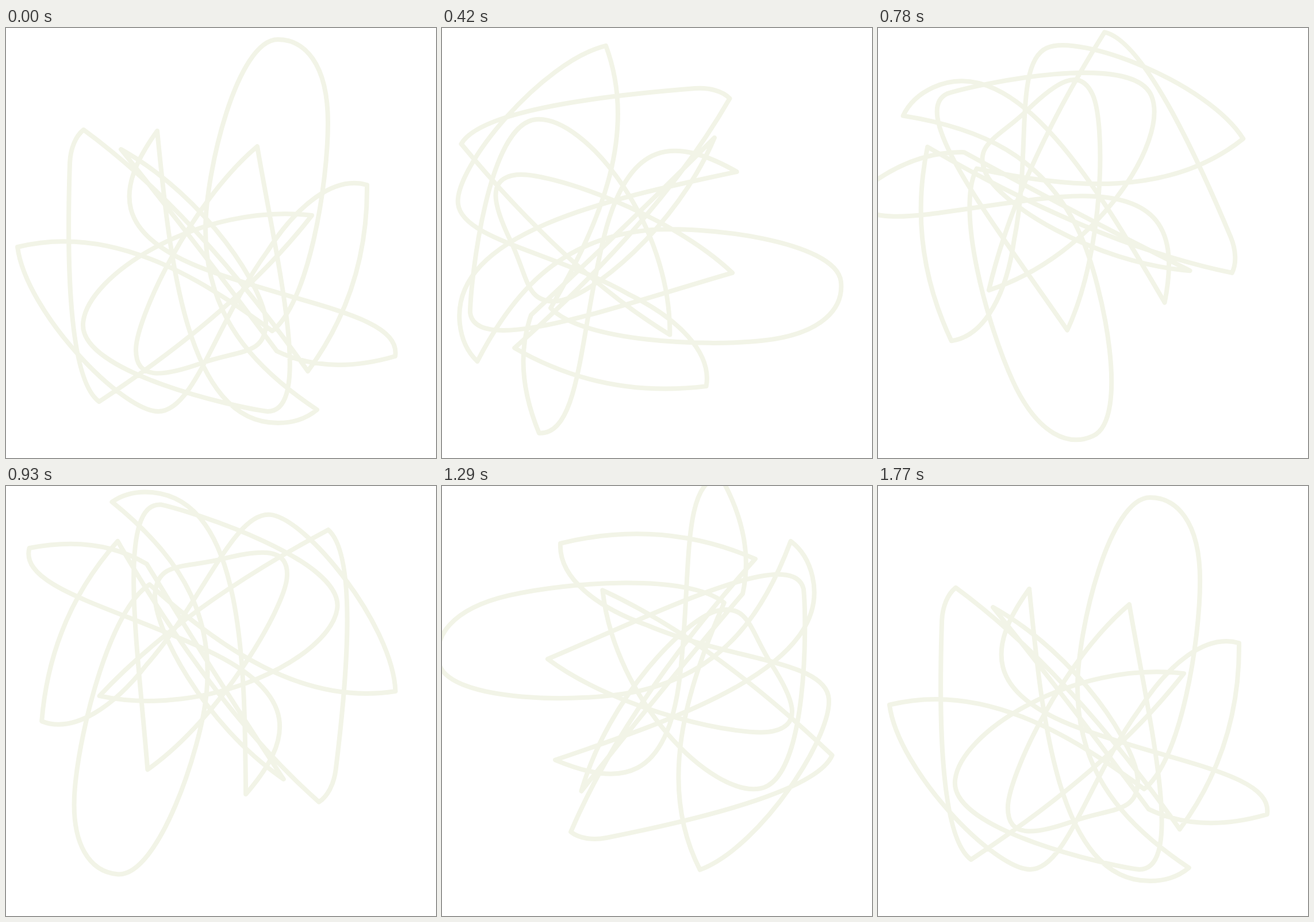
An HTML page that plays this animation: 748x748 px, repeating every 1.87 s.

```html
<!DOCTYPE html>
<html lang="en">
<head>
<meta charset="utf-8">
<title>Turning scribble</title>
<style>
  html, body { margin: 0; width: 100%; height: 100%; overflow: hidden; background: #fff; }
  svg { display: block; width: 100%; height: 100%; }
  path { fill: none; stroke: #f2f4e7; stroke-width: 8; stroke-linecap: round; stroke-linejoin: round; }
</style>
</head>
<body>
<svg viewBox="0 0 748 748">
  <!-- One closed line; each row runs from one sharp corner to the next. -->
  <path id="scribble" d="M20,381
    C180,341 330,428 463,527
    C527,478 560,270 560,165 S518,20 473,20 C402,20 347,250 347,350 C347,500 430,590 541,664
    C522,680 498,687 473,687 C312,687 285,400 263,179
    C190,280 185,360 350,421 S688,500 677,571
    Q560,605 471,562
    Q332,375 200,211
    C350,295 452,457 452,513 S405,560 340,583 S226,614 226,560 S320,305 437,206
    C472,410 535,667 455,667 C400,660 130,600 134,515 S340,303 532,326
    Q405,490 162,650
    C100,605 108,330 111,235 C112,210 121,188 135,177
    Q330,320 525,597
    Q630,455 628,273
    C570,256 505,310 455,388 C366,510 328,667 265,667 S35,495 20,381Z"/>
</svg>
<script>
  const LOOP = 1870, STEP = 30, LAST = 59;
  const CENTER = '348.2 354';

  // Degrees turned: a steady rate that picks up slightly for the final stretch.
  const angleAt = step => 5.975 * step + 0.47 * Math.max(0, step - 43);

  const path = document.getElementById('scribble');
  const begin = performance.now();

  function draw() {
    const time = (performance.now() - begin) % LOOP;
    const step = Math.min(LAST, Math.floor(time / STEP));
    path.setAttribute('transform', `rotate(${angleAt(step)} ${CENTER})`);
    requestAnimationFrame(draw);
  }
  draw();
</script>
</body>
</html>
```
